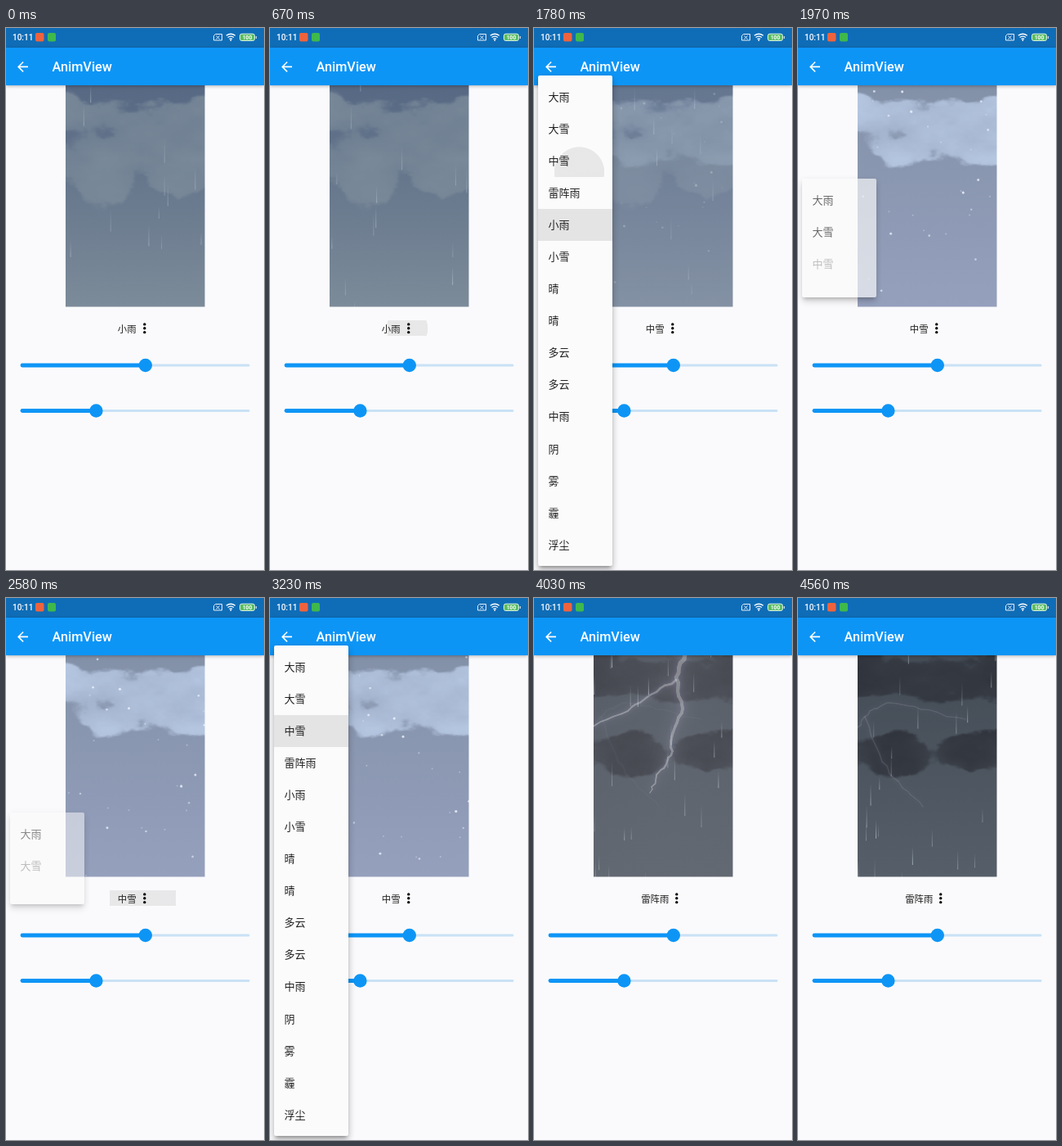
An HTML page with a canvas that plays this animation: 316x662 px, repeating every 4660 ms.

```html
<!DOCTYPE html>
<html lang="zh-CN">
<head>
<meta charset="utf-8">
<title>AnimView</title>
<style>
html, body { margin: 0; width: 100%; height: 100%; overflow: hidden; }
body { position: relative; background: #fafafc; color: #212121;
  font-family: Roboto, "Noto Sans CJK SC", "Noto Sans CJK", sans-serif; }
body > * { position: absolute; }
#status { left: 0; top: 0; width: 316px; height: 24px; background: #0f6db7; }
#bar { left: 0; top: 24px; width: 316px; height: 46px; background: #0d95f6;
  box-shadow: 0 1px 4px rgba(0,0,0,.3); }
#chrome { left: 0; top: 0; }
#title { left: 56.5px; top: 36px; font: 500 16.3px/24px Roboto, sans-serif; color: #fff; }
#clock { left: 8px; top: 4px; font: 500 10px/15px Roboto, sans-serif; color: #fff; }
#scene { left: 73px; top: 70px; clip-path: inset(0 .5px .4px 0); }
#ripple { left: 127px; top: 357px; width: 81px; height: 19px; }
#label { left: 0; top: 357px; width: 316px; height: 20px; display: flex;
  justify-content: center; align-items: center; font-size: 11.4px; }
#label svg { width: 19.5px; height: 19.5px; }
#sliders { left: 0; top: 395px; }
#menu { left: 4.5px; overflow: hidden; border-radius: 2px; background: #fbfbfb;
  box-shadow: 0 4px 4px -2px rgba(0,0,0,.26), 0 6px 8px rgba(0,0,0,.16), 0 2px 9px 1px rgba(0,0,0,.1); }
#menu div { position: absolute; left: 0; width: 92px; height: 39.07px;
  padding-left: 13px; box-sizing: border-box; font-size: 13px; line-height: 39px; }
</style>
</head>
<body>
<canvas id="scene" width="171" height="271"></canvas>
<div id="status"></div>
<div id="bar"></div>
<svg id="chrome" width="316" height="70" fill="none" stroke="#fff">
  <rect x="36" y="6" width="10.5" height="10.5" rx="2" fill="#ee633d" stroke="none"/>
  <rect x="51" y="6" width="10" height="10.5" rx="2" fill="#3fb84c" stroke="none"/>
  <path d="M256.5 7.5H264.5V15H254.5V9.500ZM257.5 9.500l4 4M261.5 9.500l-4 4" stroke-width=".9"/>
  <path d="M269.8 9.300q5.500-4.200 11 0M271.6 11.500q3.700-2.800 7.400 0M273.5 13.500q1.800-1.300 3.600 0" stroke-width="1.4"/>
  <circle cx="275.3" cy="15" r=".9" fill="#fff" stroke="none"/>
  <rect x="286.5" y="7.2" width="18" height="8.3" rx="2.2" fill="#58bd62" stroke="#e5f6e8"/>
  <path d="M306.3 10v3"/>
  <text x="295.5" y="13.9" font-family="Roboto, sans-serif" font-weight="700" font-size="6.8" text-anchor="middle" fill="#fff" stroke="none">100</text>
  <path transform="translate(10.8 37.7) scale(.81)" fill="#fff" stroke="none"
    d="M20 11H7.830l5.590-5.590L12 4l-8 8 8 8 1.410-1.410L7.830 13H20z"/>
</svg>
<div id="clock">10:11</div>
<div id="title">AnimView</div>
<div id="ripple"></div>
<div id="label"><span id="name"></span>
  <svg viewBox="0 0 24 24"><circle cx="12" cy="6" r="2.1"/><circle cx="12" cy="12" r="2.1"/><circle cx="12" cy="18" r="2.1"/></svg>
</div>
<svg id="sliders" width="316" height="90" stroke-linecap="round"></svg>
<div id="menu"></div>
<script>
const $ = id => document.getElementById(id);
const LOOP = 4660, W = 171, H = 271;
const ITEMS = '大雨 大雪 中雪 雷阵雨 小雨 小雪 晴 晴 多云 多云 中雨 阴 雾 霾 浮尘'.split(' ');
const ROW = 39.07, PAD = 6.5, FULL = ITEMS.length * ROW + 2 * PAD;
const MENUS = [
  { selected: 4, pick: 2, open: 700, close: 1715 },
  { selected: 2, pick: 3, open: 2530, close: 3354 }
];
const clamp = v => Math.max(0, Math.min(1, v));
const span = (v, a, b) => clamp((v - a) / (b - a));
const smooth = v => v * v * (3 - 2 * v);
const mix = (a, b, f) => a + (b - a) * f;
const mod = (v, n) => ((v % n) + n) % n;
const hash = (a, b = 0) => mod(Math.sin(a * 127.1 + b * 311.7 + 4.3) * 43758.5453, 1);

// Sliders
$('sliders').innerHTML = [[17, 170.8], [72.5, 110.4]].map(([y, x]) =>
  `<path d="M${x} ${y}H297" stroke="#c9e2f6" stroke-width="3.2"/>
   <path d="M20 ${y}H${x}" stroke="#0d95f6" stroke-width="4.9"/>
   <circle cx="${x}" cy="${y}" r="8.2" fill="#0d95f6"/>`).join('');

// Popup menu
const rows = ITEMS.map((text, i) => {
  const row = document.createElement('div');
  row.textContent = text;
  row.style.top = PAD + i * ROW + 'px';
  $('menu').append(row);
  return row;
});

const disc = (x, y, r, alpha) =>
  `radial-gradient(circle at ${x}px ${y}px, rgba(200,200,200,${alpha}) ${r}px, transparent ${r + .7}px)`;

function drawMenu(t) {
  const m = MENUS[t < 2200 ? 0 : 1];
  const p = t < m.close ? span(t, m.open, m.open + 300) : clamp((m.close + 300 - t) / 200);
  const unit = 1 / (ITEMS.length + 1.5);
  const h = FULL * span(p, 0, unit * ITEMS.length);
  const top = 366.6 - PAD - (m.selected + .5) * ROW;
  Object.assign($('menu').style, {
    display: p ? 'block' : 'none',
    opacity: clamp(p * 3),
    top: Math.min(top, 657.3 - h) + 'px',
    width: 91.6 * span(p, 0, unit) + 'px',
    height: h + 'px'
  });
  const tap = t - m.close + 50;
  rows.forEach((row, i) => {
    const start = (i + 1) * unit;
    row.style.opacity = span(p, start, start + 1.5 * unit);
    row.style.backgroundColor = i === m.selected ? 'rgba(0,0,0,.09)' : 'transparent';
    row.style.backgroundImage = i === m.pick && tap > 0
      ? disc(50.5, 33, 10 + tap * .175, .38 * (1 - span(tap, 130, 230))) : 'none';
  });
  const press = t - m.open + 100;
  $('ripple').style.backgroundImage = press > 0 && press < 400
    ? disc(41, 10, Math.min(41.5, 10 + press * .21), .36 * (1 - span(press, 180, 390))) : 'none';
}

function layer() {
  const c = document.createElement('canvas');
  c.width = W;
  c.height = H;
  return [c, c.getContext('2d')];
}

// Fractal value noise
function noise(x, y) {
  const ix = Math.floor(x), iy = Math.floor(y);
  const fx = smooth(x - ix), fy = smooth(y - iy);
  return mix(mix(hash(ix, iy), hash(ix + 1, iy), fx),
    mix(hash(ix, iy + 1), hash(ix + 1, iy + 1), fx), fy);
}
function fractal(x, y) {
  let sum = 0;
  for (let k = 0; k < 5; k++) sum += noise(x * 2 ** k + k * 17, y * 2 ** k) / 2 ** (k + 1);
  return sum;
}

// Sky gradient with banks of cloud, each a centre height and half thickness
function backdrop(top, bottom, cloud, alpha, banks) {
  const [c, g] = layer();
  const sky = g.createLinearGradient(0, 0, 0, H);
  sky.addColorStop(0, top);
  sky.addColorStop(1, bottom);
  g.fillStyle = sky;
  g.fillRect(0, 0, W, H);
  const img = g.getImageData(0, 0, W, H);
  for (let y = 0; y < H; y++) {
    const cover = Math.max(...banks.map(([mid, half]) => 1 - ((y - mid) / half) ** 2));
    if (cover < -1) continue;
    for (let x = 0; x < W; x++) {
      const n = fractal(x / 46, y / 30);
      const body = smooth(span(n - .5 + cover * .4, 0, .16));
      const a = alpha * body * (.62 + .7 * (n - .2));
      cloud.forEach((v, k) => {
        const i = 4 * (y * W + x) + k;
        img.data[i] = mix(img.data[i], v, clamp(a));
      });
    }
  }
  g.putImageData(img, 0, 0);
  return c;
}

const ctx = $('scene').getContext('2d');

function drawRain(count, t, alpha) {
  const range = H + 40;
  for (let i = 0; i < count; i++) {
    const fall = hash(i, 1) * range + t * (.36 + .14 * hash(i, 3));
    const lap = Math.floor(fall / range);
    const x = hash(i, lap + 60) * W, end = fall - lap * range;
    const len = 15 + 15 * hash(i, 7);
    const fade = ctx.createLinearGradient(0, end - len, 0, end);
    fade.addColorStop(0, 'rgba(215,225,235,0)');
    fade.addColorStop(1, `rgba(215,225,235,${alpha * (.4 + .6 * hash(i, 9))})`);
    ctx.fillStyle = fade;
    ctx.fillRect(x - .5, end - len, 1.1, len);
  }
}

function drawSnow(t) {
  for (let i = 0; i < 28; i++) {
    const size = hash(i, 4) ** 2;
    ctx.fillStyle = `rgba(240,245,255,${.3 + .6 * size})`;
    ctx.beginPath();
    ctx.arc(mod(hash(i, 11) * W + t * (.016 + .006 * hash(i, 5)), W),
      mod(hash(i, 12) * H + t * (.047 + .008 * hash(i, 6)), H + 8) - 4,
      1 + .7 * size, 0, 7);
    ctx.fill();
  }
}

// Jagged tapering line through a few points, with a glow
function bolt(points, wide, thin, glow) {
  const [line, g] = layer();
  const steps = 5, total = (points.length - 1) * steps;
  g.strokeStyle = '#fff';
  g.lineCap = 'round';
  let [px, py] = points[0];
  for (let i = 1; i <= total; i++) {
    const k = Math.floor((i - 1) / steps), f = (i - k * steps) / steps;
    const jag = f < 1 ? 4 : 0;
    const x = mix(points[k][0], points[k + 1][0], f) + (hash(i, 21) - .5) * jag;
    const y = mix(points[k][1], points[k + 1][1], f) + (hash(i, 22) - .5) * jag;
    g.lineWidth = mix(wide, thin, i / total);
    g.beginPath();
    g.moveTo(px, py);
    g.lineTo(x, y);
    g.stroke();
    [px, py] = [x, y];
  }
  const [c, out] = layer();
  [[glow * 3, '#e6e0f5'], [glow, '#b9b0f0']].forEach(([blur, color]) => {
    out.shadowBlur = blur;
    out.shadowColor = color;
    out.drawImage(line, 0, 0);
  });
  return c;
}

const mainBolts = [
  bolt([[112, -2], [101, 27], [109, 65], [97, 95], [95, 122], [77, 146], [69, 168]], 5, 1, 7),
  bolt([[101, 30], [70, 48], [42, 68], [-1, 87]], 2.6, 1.3, 5)
];
const sideBolts = [
  bolt([[0, 88], [15, 68], [40, 58], [77, 66], [132, 78]], 1.4, .8, 4),
  bolt([[9, 75], [30, 130], [55, 162], [80, 185]], 1.4, .8, 4)
];

// Quick rise, slow decay
const pulse = d => d < 225 ? span(d, 0, 225) ** 2 : clamp(1 - (d - 225) / 675);

function drawStorm(t) {
  const first = pulse(t - 3354), second = pulse(t - 3954);
  const flash = ctx.createRadialGradient(104, 30, 0, 104, 90, 190);
  flash.addColorStop(0, `rgba(205,200,208,${.52 * first})`);
  flash.addColorStop(1, `rgba(190,182,187,${.34 * first})`);
  ctx.fillStyle = flash;
  ctx.fillRect(0, 0, W, H);
  drawRain(26, t, .55);
  const show = (bolts, alpha) => {
    ctx.save();
    ctx.globalAlpha *= alpha;
    bolts.forEach(b => ctx.drawImage(b, 0, 0));
    ctx.restore();
  };
  show(mainBolts, first);
  show(sideBolts, second * .25);
}

const SCENES = [
  { name: 4, start: -1000, draw: t => drawRain(14, t, .45),
    sky: backdrop('#566883', '#7c8b99', [124, 140, 155], .85, [[80, 66]]) },
  { name: 2, start: MENUS[0].close, draw: drawSnow,
    sky: backdrop('#8391a8', '#95a0bd', [180, 197, 224], 1, [[54, 40]]) },
  { name: 3, start: MENUS[1].close, draw: drawStorm,
    sky: backdrop('#434b55', '#565f69', [46, 49, 57], .9, [[26, 32], [122, 26]]) }
];

function drawScene(t) {
  const now = SCENES.filter(s => t >= s.start).length - 1;
  const fade = span(t, SCENES[now].start, SCENES[now].start + 200);
  const paint = (scene, alpha) => {
    ctx.globalAlpha = alpha;
    ctx.drawImage(scene.sky, 0, 0);
    scene.draw(t);
  };
  if (fade < 1) paint(SCENES[now - 1], 1);
  paint(SCENES[now], fade);
  $('name').textContent = ITEMS[SCENES[now].name];
}

const begin = performance.now();
function tick() {
  const t = (performance.now() - begin) % LOOP;
  drawScene(t < 120 ? 0 : Math.min(t, 4560));
  drawMenu(t);
  requestAnimationFrame(tick);
}
tick();
</script>
</body>
</html>
```
